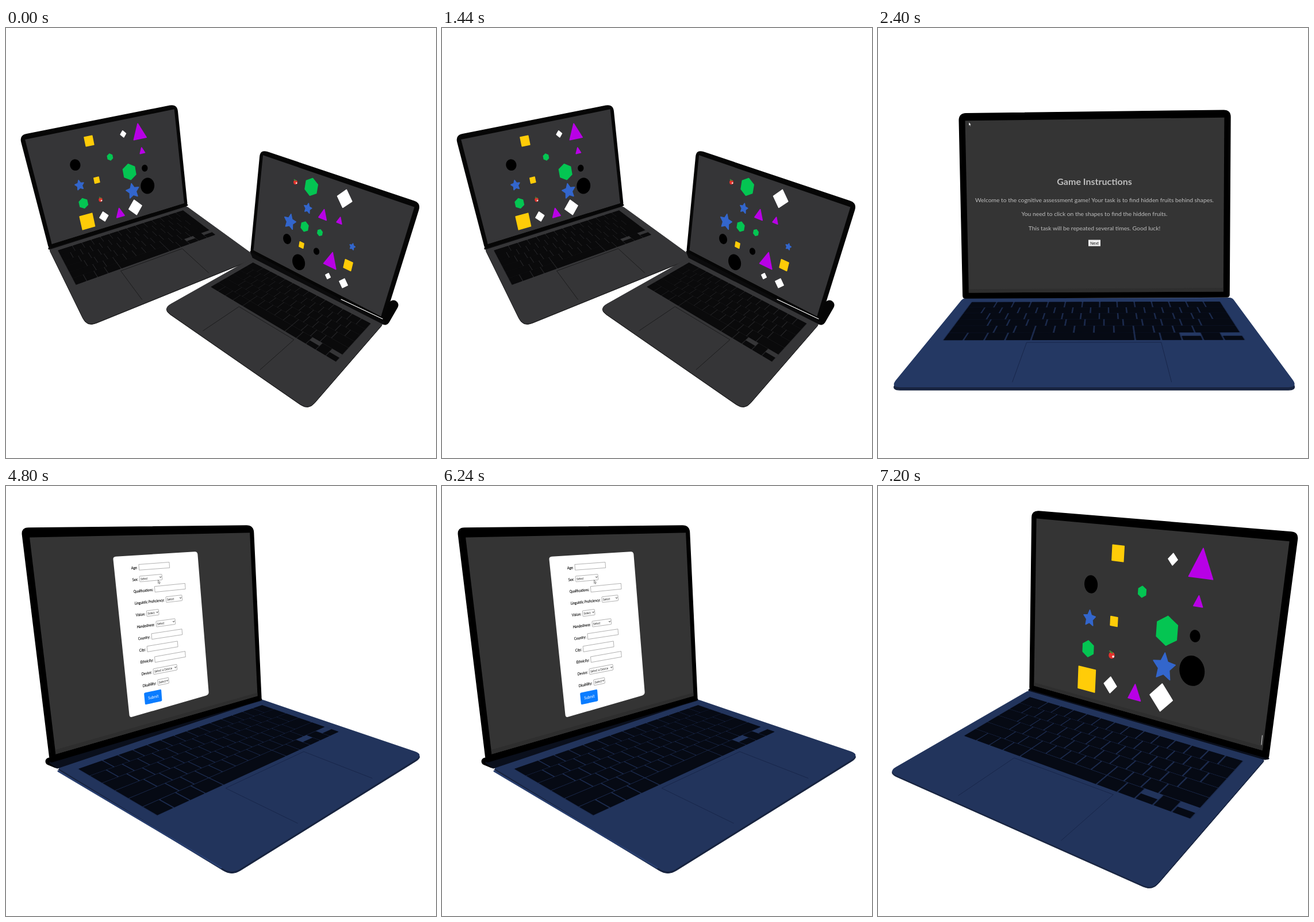
Recreate the animation shown at these times as an HTML page. Size 748x748 px, loop 9600 ms.

```html
<!DOCTYPE html>
<html lang="en">
<head>
<meta charset="utf-8">
<title>Laptop slideshow</title>
<style>
html, body { margin: 0; width: 100%; height: 100%; overflow: hidden; background: #fff; }
svg { display: block; width: 100vw; height: 100vh; }
text { font-family: Lato, "Open Sans", sans-serif; }
.ui { font-family: "Liberation Sans", Arial, sans-serif; }
</style>
</head>
<body>
<svg id="stage" viewBox="0 0 748 748"></svg>
<script>
const HOLD = 2400;
const stage = document.getElementById('stage');

const NIGHT = { body: '#353537', rim: '#1b1b1c', key: '#0a0a0b', gap: '#232325', pad: '#1c1c1d', hinge: '#0b0b0c', lid: '#060606', screen: '#353537', lip: '#353537' };
const NAVY = { body: '#22345c', rim: '#17233f', key: '#060a14', gap: '#1b2a4c', pad: '#18264a', hinge: '#0a0f1c', lid: '#000', screen: '#343434', lip: '#2e2e2e' };

function add(parent, tag, attrs, text) {
  const el = document.createElementNS('http://www.w3.org/2000/svg', tag);
  for (const k in attrs) el.setAttribute(k, attrs[k]);
  if (text) el.textContent = text;
  parent.appendChild(el);
  return el;
}

const parse = s => s.split(' ').map(p => p.split(',').map(Number));
const join = pts => pts.map(p => p.map(v => v.toFixed(2)).join()).join(' ');
const rect = (x, y, w, h) => [[x, y], [x + w, y], [x + w, y + h], [x, y + h]];
const UNIT = rect(0, 0, 1, 1);

// Polygon with one corner radius per vertex, softened by a stroke of the same colour
function poly(g, pts, fill, radii = [], grow = 0) {
  const n = pts.length;
  const toward = (a, b, r) => {
    const k = Math.min(r / Math.hypot(b[0] - a[0], b[1] - a[1]), .5);
    return [a[0] + (b[0] - a[0]) * k, a[1] + (b[1] - a[1]) * k];
  };
  const d = pts.map((p, i) => {
    const r = radii[i] || 0;
    const a = toward(p, pts[(i + n - 1) % n], r), b = toward(p, pts[(i + 1) % n], r);
    return `${i ? 'L' : 'M'}${a}Q${p} ${b}`;
  }).join('') + 'Z';
  add(g, 'path', { d, fill, stroke: fill, 'stroke-width': grow, 'stroke-linejoin': 'round' });
}

function line(g, points, stroke, width = 1) {
  add(g, 'polyline', { points, stroke, fill: 'none', 'stroke-width': width, 'stroke-linecap': 'round' });
}

// Projective map taking four points to four others
function project(src, dst) {
  const m = [];
  src.forEach(([x, y], i) => {
    const [u, v] = dst[i];
    m.push([x, y, 1, 0, 0, 0, -u * x, -u * y, u], [0, 0, 0, x, y, 1, -v * x, -v * y, v]);
  });
  for (let c = 0; c < 8; c++) {
    let best = c;
    for (let r = c; r < 8; r++) if (Math.abs(m[r][c]) > Math.abs(m[best][c])) best = r;
    [m[c], m[best]] = [m[best], m[c]];
    for (let r = 0; r < 8; r++) {
      if (r === c) continue;
      const k = m[r][c] / m[c][c];
      for (let j = c; j < 9; j++) m[r][j] -= k * m[c][j];
    }
  }
  const h = m.map((row, i) => row[8] / row[i]);
  return ([x, y]) => {
    const w = h[6] * x + h[7] * y + 1;
    return [(h[0] * x + h[1] * y + h[2]) / w, (h[3] * x + h[4] * y + h[5]) / w];
  };
}

// Key widths per row: [first, count of single keys, last]
const ends = (first, count, last) => [first, ...Array(count).fill(1), last];
const ROWS = [
  ends(1.5, 12, 1), ends(1, 12, 1.5), ends(1.5, 12, 1), ends(1.75, 11, 1.75), ends(2.25, 10, 2.25),
  [1, 1, 1, 1.25, 5, 1.25, 1, 1, 1, 1]
];
const DECK = rect(.042, .066, .905, .51);

function keyboard(g, map, look) {
  poly(g, DECK.map(map), look.gap);
  const place = project(rect(0, 0, 14.5, 6), DECK);
  ROWS.forEach((row, r) => {
    let x = 0;
    row.forEach((w, i) => {
      const half = r === 5 && (i === 7 || i === 9) ? .45 : 0;
      const key = rect(x + .055, r + .04 + half, w - .11, .92 - half);
      if (half) poly(g, rect(x, r, w, half).map(place).map(map), look.body);
      poly(g, key.map(place).map(map), look.key, [], .9);
      x += w;
    });
  });
}

// Everything follows from the corners of the lid and the base; returns the screen corners
function laptop(g, lidText, baseText, look, depth) {
  const lid = parse(lidText), base = parse(baseText);
  const onLid = project(UNIT, lid), onBase = project(UNIT, base);
  const corners = [5, 5, 17, 17];
  poly(g, base.map(([x, y]) => [x, y + depth]), look.rim, corners, 1);
  poly(g, base, look.body, corners);
  keyboard(g, onBase, look);
  line(g, join([[.297, .96], [.297, .6], [.695, .6], [.695, .96]].map(onBase)), look.pad);
  poly(g, [lid[3], lid[2], base[1], base[0]], look.hinge, [], 3);
  poly(g, lid, look.lid, [12, 12, 4, 4], 1.5);
  const screen = rect(.022, .038, .956, .932).map(onLid);
  poly(g, screen, look.screen);
  poly(g, rect(.022, .95, .956, .02).map(onLid), look.lip);
  return screen;
}

const ring = (n, r) => Array.from({ length: n }, (_, i) => {
  const a = i * 2 * Math.PI / n - Math.PI / 2, k = i % 2 ? r : 1;
  return [k * Math.cos(a), k * Math.sin(a)];
});

// Outline and colour of each game piece
const FORMS = {
  square: [rect(-.86, -.86, 1.72, 1.72), '#ffcc08'],
  diamond: [ring(4, 1), '#fff'],
  tri: [[[0, -.95], [.95, .9], [-.95, .9]], '#b800e6'],
  hex: [ring(6, 1), '#04c552'],
  dot: [ring(40, 1), '#000'],
  star: [ring(10, .5).map(([x, y]) => [x, y + .08]), '#3366cc']
};
const PAGE = rect(0, 0, 1480, 900);
const SIZES = [69, 42, 26];

// Positions are listed from the large piece to the small one; "-" skips a size
function pieces(g, screen, layout, after = p => p) {
  const out = project(PAGE, screen), back = project(screen, PAGE);
  for (const form in layout) {
    const [outline, fill] = FORMS[form];
    layout[form].split(' ').forEach((spot, i) => {
      if (spot === '-') return;
      const [cx, cy] = back(spot.split(',').map(Number));
      const pts = outline.map(([u, v]) => after(out([cx + u * SIZES[i], cy + v * SIZES[i]])));
      poly(g, pts, fill, [], 1.8);
    });
  }
}

const GAME = {
  square: '363,336 417.5,117 410.5,235.5',
  diamond: '492.5,368 404,346 513,127.5',
  tri: '563.5,135 446.5,358.5 557.5,200.5',
  hex: '502.5,252 365.5,283 459.5,184',
  dot: '546,321.5 370.5,171 551.5,261',
  star: '497.5,313 368,229'
};
const GAME_TWO = {
  square: '- 595,412.5 514,377.5',
  diamond: '589,297 587,444 560,431.5',
  tri: '565.5,403 552,324 580.5,334.5',
  hex: '531,276.5 519.5,345.5 546,356',
  dot: '509,407.5 489,367 540,388.5',
  star: '494,336 525,313 602.5,380'
};

function apple(g, x, y, r) {
  add(g, 'ellipse', { cx: x, cy: y, rx: r, ry: r * 1.15, fill: '#e5322d' });
  add(g, 'circle', { cx: x + r * .5, cy: y + r * .45, r: r * .38, fill: '#f4e9e6' });
  line(g, `${x - r * .6},${y - r * 1.4} ${x + r * .2},${y - r * .8}`, '#3f8f35', r * .45);
}

function pointer(g, x, y, fill) {
  add(g, 'path', { d: 'M0 0L0 6L1.4 4.8L2.4 7L3.3 6.6L2.3 4.4L4 4.2Z', transform: `translate(${x} ${y})`, fill, stroke: '#222', 'stroke-width': .4 });
}

const GAME_LID = '268,43 731,81 679,474 264,354';

function pair(g) {
  laptop(g, '24,187 297,133 315,308 75,383', '75,384 313,309 437,399 141,519', NIGHT, 1);
  const tilt = project(
    parse('417.5,117 564,134.5 492.5,368 363,336'),
    parse('144.5,196.5 231.5,179.5 225,312 141.5,336.5'));
  const wall = rect(.022, .038, .956, .932).map(project(UNIT, parse(GAME_LID)));
  pieces(g, wall, GAME, tilt);
  apple(g, 164.5, 298.8, 3.2);

  line(g, '674,482 659,508', '#050505', 17);
  const screen = laptop(g, '443,212 721,305 657,510 426,389', '430,399 656,514 526,664 272,488', NIGHT, 1);
  line(g, '583,472 655,506', '#fff', 1.2);
  pieces(g, screen, GAME_TWO);
  apple(g, 503.5, 268.3, 3.4);
}

function intro(g) {
  laptop(g, '141,149 613,143 611,468 148,470', '148,470 616,469 731,625 21,625', { ...NAVY, body: '#243863' }, 5);
  const write = (y, size, text, weight = 400) => add(g, 'text', {
    x: 376.5, y, 'font-size': size, 'font-weight': weight, 'text-anchor': 'middle', fill: '#bdbdbd'
  }, text);
  write(273, 16, 'Game Instructions', 700);
  [
    'Welcome to the cognitive assessment game! Your task is to find hidden fruits behind shapes.',
    'You need to click on the shapes to find the hidden fruits.',
    'This task will be repeated several times. Good luck!'
  ].forEach((text, i) => write(302.5 + 24.6 * i, 10.3, text));
  add(g, 'rect', { x: 366, y: 368.5, width: 21, height: 11, fill: '#efefef' });
  add(g, 'text', { x: 376.5, y: 376.7, 'font-size': 7, 'text-anchor': 'middle', class: 'ui', fill: '#111' }, 'Next');
  pointer(g, 158, 164, '#fff');
}

// Label, then width and choice for drop-down lists
const FIELDS = [
  ['Age:'], ['Sex:', 39, 'Select'], ['Qualifications:'], ['Linguistic Proficiency:', 28, 'Select'],
  ['Vision:', 21, 'Select'], ['Handedness:', 33, 'Select'], ['Country:'], ['City:'],
  ['Ethnicity:'], ['Device:', 41, 'Select a Device'], ['Disability:', 19, 'Select']
];
const SQUEEZE = .8;

function survey(g) {
  line(g, '75,479 87,484', '#000', 13);
  laptop(g, '27,73 430,69 444,372 77,481', '89,490 444,371 727,467 393,675', NAVY, 3);
  line(g, '91,496 374,664', '#283e6e', 3);
  poly(g, parse('186,123 333,114 353,363 215,403'), '#fff', [5, 5, 5, 5]);

  FIELDS.forEach(([label, span = 53, choice], i) => {
    const slope = -(.075 + i * .013) * SQUEEZE;
    const row = add(g, 'g', { transform: `matrix(${SQUEEZE} ${slope} .08 1 ${218 + 2 * i} ${145 + 20.5 * i})` });
    const name = add(row, 'text', { 'font-size': 6.8, fill: '#000', stroke: '#000', 'stroke-width': .12 }, label);
    const left = name.getComputedTextLength() + 3.5, width = span / SQUEEZE;
    add(row, 'rect', { x: left, y: -7.5, width, height: 9.8, rx: choice ? 1 : 0, fill: '#fff', stroke: '#888', 'stroke-width': .7 });
    if (!choice) return;
    add(row, 'text', { x: left + 2, y: -.6, 'font-size': 5.6, class: 'ui', fill: '#222' }, choice);
    const tip = left + width - 5;
    line(row, `${tip},-3.5 ${tip + 1.6},-1.8 ${tip + 3.2},-3.5`, '#222', .9);
  });
  poly(g, parse('240,360 270,353.5 271.5,374 242,380.5'), '#0a7cff', [2, 2, 2, 2]);
  add(g, 'text', { 'font-size': 7.4, fill: '#fff', transform: `matrix(${SQUEEZE} -.17 .08 1 247.5 371.5)` }, 'Submit');
  pointer(g, 264.5, 163.5, '#ddd');
}

function game(g) {
  const screen = laptop(g, GAME_LID, '263,355 673,475 477,702 17,497', NAVY, 2);
  line(g, '668.5,434 667,450', '#ddd');
  pieces(g, screen, GAME);
  apple(g, 406.5, 294.5, 5.2);
}

// Draw while visible so that text can be measured
const scenes = [pair, intro, survey, game].map(draw => {
  const g = add(stage, 'g', {});
  draw(g);
  return g;
});

function render(ms) {
  const now = Math.floor(ms / HOLD) % scenes.length;
  scenes.forEach((g, i) => g.setAttribute('display', i === now ? 'inline' : 'none'));
}

function tick() {
  render(performance.now());
  requestAnimationFrame(tick);
}
tick();
</script>
</body>
</html>
```
